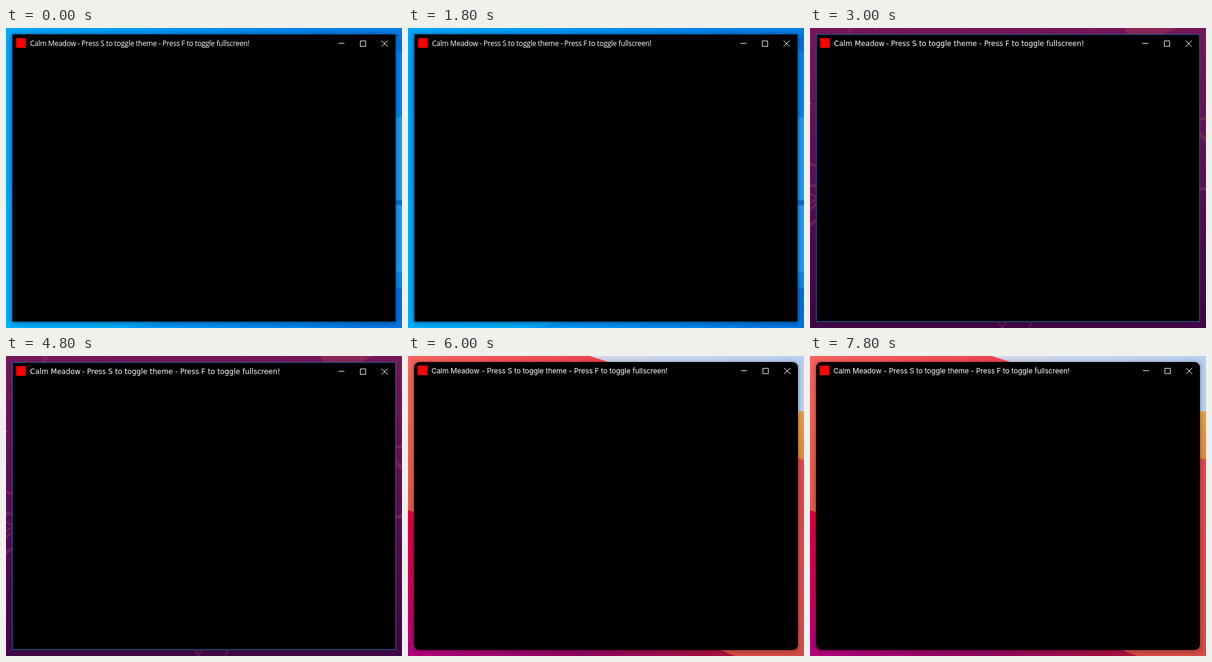
Recreate the animation shown at these times as an HTML page. Size 660 px wide and 500 px high, loop 9 s.

```html
<!DOCTYPE html>
<html lang="en">
<head>
<meta charset="utf-8">
<title>Window themes</title>
<style>
  html, body { margin: 0; width: 100%; height: 100%; overflow: hidden; background: #000; }
  svg { display: block; width: 660px; height: 500px; }
  text { fill: #fff; font-size: 12px; }
  .open { font-family: "Open Sans", "Noto Sans", sans-serif; letter-spacing: -.25px; }
  .deja { font-family: "DejaVu Sans", sans-serif; }
  .inter { font-family: Inter, sans-serif; letter-spacing: -.08px; }
</style>
</head>
<body>
<svg viewBox="0 0 660 500" xmlns="http://www.w3.org/2000/svg">
  <defs>
    <linearGradient id="sky">
      <stop offset="0" stop-color="#00a8fc"/>
      <stop offset=".5" stop-color="#0092f4"/>
      <stop offset="1" stop-color="#0074e4"/>
    </linearGradient>
    <linearGradient id="plum" x2="0" y2="1">
      <stop offset="0" stop-color="#76195a"/>
      <stop offset=".5" stop-color="#5c0f56"/>
      <stop offset="1" stop-color="#410645"/>
    </linearGradient>
    <linearGradient id="coral" x2="0" y2="1">
      <stop offset="0" stop-color="#f7635f"/>
      <stop offset="1" stop-color="#e25a48"/>
    </linearGradient>
    <linearGradient id="top">
      <stop offset="0" stop-color="#f7635f"/>
      <stop offset="1" stop-color="#f04150"/>
    </linearGradient>
    <linearGradient id="rose" x2="0" y2="1">
      <stop offset="0" stop-color="#e2003c"/>
      <stop offset=".5" stop-color="#d00054"/>
      <stop offset="1" stop-color="#b4007c"/>
    </linearGradient>
    <linearGradient id="base">
      <stop offset="0" stop-color="#b4007c"/>
      <stop offset=".45" stop-color="#90065e"/>
      <stop offset=".8" stop-color="#a8123f"/>
      <stop offset="1" stop-color="#b81a3c"/>
    </linearGradient>
    <linearGradient id="pale">
      <stop offset="0" stop-color="#d3d9ee"/>
      <stop offset="1" stop-color="#b9d0f2"/>
    </linearGradient>
    <linearGradient id="amber" x2="0" y2="1">
      <stop offset="0" stop-color="#e7a04a"/>
      <stop offset="1" stop-color="#e18a35"/>
    </linearGradient>
    <linearGradient id="brick" x2="0" y2="1">
      <stop offset="0" stop-color="#e4474f"/>
      <stop offset="1" stop-color="#d74b45"/>
    </linearGradient>
    <filter id="soft" x="-10%" y="-10%" width="120%" height="120%">
      <feGaussianBlur stdDeviation="4"/>
    </filter>
    <g id="controls" fill="none" stroke="#fff">
      <path d="M554 25.5h10M590.5 21.5h9v9h-9z"/>
      <path d="M626 21l10 10M636 21l-10 10"/>
    </g>
    <rect id="icon" x="17" y="17" width="16" height="16" fill="#f00"/>
    <rect id="shade" x="10" y="11" width="640" height="480" rx="4" filter="url(#soft)"/>
  </defs>

  <g class="scene">
    <path fill="url(#sky)" d="M0 0h660v500H0z"/>
    <path fill="#00b4ff" opacity=".6" d="M0 300L10 250V490H260L200 500H0z"/>
    <path fill="#0a86ec" d="M520 0Q540 3 556 10H660V0z" opacity=".5"/>
    <path fill="#0087f2" d="M645 36L660 40V150H645z"/>
    <path fill="#1c9dfc" d="M645 151L660 148V287H645zM645 295H660V405L645 409z"/>
    <path fill="#0071da" d="M645 287h15v8h-15z"/>
    <path fill="#0a8bf0" d="M645 409L660 405V433H645z"/>
    <path fill="none" stroke="#35b4ff" d="M648 407Q655 407 660 404"/>
    <use href="#shade" opacity=".5"/>
    <path d="M10.500 10.500h639v479h-639z" stroke="#0b4a7c"/>
    <use href="#icon"/><use href="#controls"/>
    <text class="open" x="40" y="30">Calm Meadow <tspan x="119.3">- Press S to toggle theme - Press F to toggle fullscreen!</tspan></text>
  </g>

  <g class="scene">
    <path fill="url(#plum)" d="M0 0h660v500H0z"/>
    <path fill="#8d2859" d="M524 0h88l-22 10h-62z"/>
    <g fill="none" stroke="#88265f" opacity=".75">
      <path stroke-width="7" d="M67 0l-5 11"/>
      <path stroke-width="2" d="M112 0l-6 11M168 0l-4 11M250 0l5 11M392 0l-4 11M468 0l9 11"/>
      <path stroke-width="5" d="M648 153l12-3M648 174l12 13M648 268h12M0 226l12 4M0 262l12 2M0 328l12-8"/>
      <path stroke-width="3" d="M0 277l12 5M0 291l12-6M0 303l12-12"/>
    </g>
    <path fill="none" stroke="#6b1d5c" stroke-width="3" d="M314 489l6 11 8-11M370 489l-5 11" opacity=".7"/>
    <circle cx="0" cy="126" r="1.500" fill="#b77a9e"/>
    <use href="#shade" opacity=".25"/>
    <path d="M10.500 10.500h639v479h-639z" stroke="#2b70bf"/>
    <use href="#icon"/><use href="#controls"/>
    <text class="deja" x="40" y="30">Calm Meadow <tspan x="126.8">- Press S to toggle theme - Press F to toggle fullscreen!</tspan></text>
  </g>

  <g class="scene">
    <path fill="url(#coral)" d="M0 0h20v262H0z"/>
    <path fill="url(#top)" d="M0 0h350v20H0z"/>
    <path fill="url(#pale)" d="M303 0H660V98H640V20H365z"/>
    <path fill="url(#amber)" d="M640 92h20v82h-20z"/>
    <path fill="url(#brick)" d="M640 167L660 173V500H640z"/>
    <path fill="url(#rose)" d="M0 257L20 264V500H0z"/>
    <path fill="url(#base)" d="M0 480H640V500H0z"/>
    <path fill="#d74b45" d="M505 480Q525 494 546 500H660V480z"/>
    <use href="#shade" opacity=".35"/>
    <rect x="10" y="10" width="640" height="480" rx="9"/>
    <g transform="translate(-1 -1)"><use href="#icon"/></g>
    <g transform="translate(1 -1)"><use href="#controls"/></g>
    <text class="inter" x="39" y="29">Calm Meadow <tspan x="122.8">- Press S to toggle theme - Press F to toggle fullscreen!</tspan></text>
  </g>
</svg>
<script>
  const HOLD = 3000;
  const scenes = [...document.querySelectorAll('.scene')];
  const start = performance.now();

  function draw(ms) {
    const current = Math.floor(ms / HOLD) % scenes.length;
    scenes.forEach((scene, i) => {
      scene.style.display = i === current ? '' : 'none';
    });
  }

  function tick() {
    draw(performance.now() - start);
    requestAnimationFrame(tick);
  }

  tick();
</script>
</body>
</html>
```
